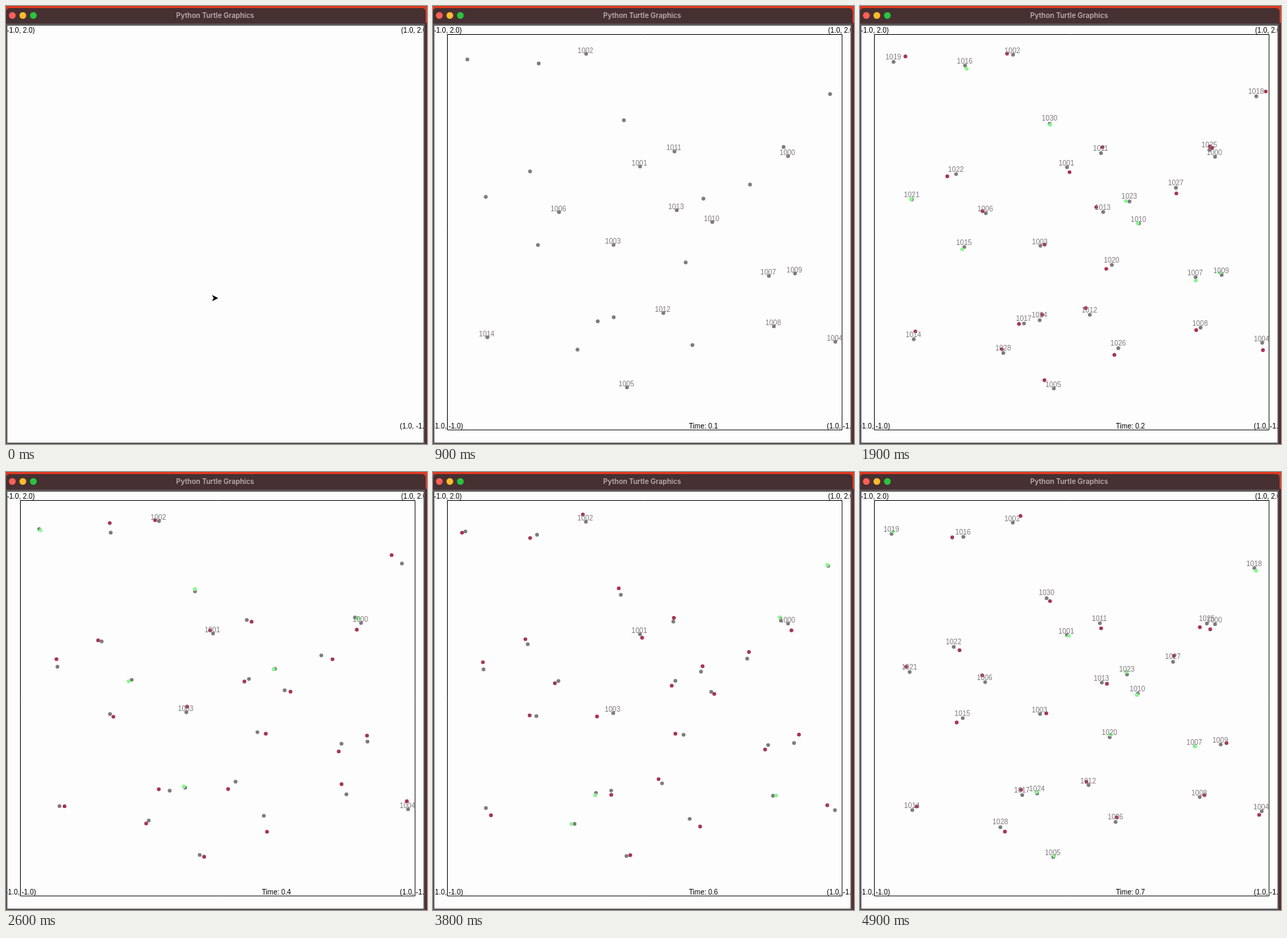
Recreate the animation shown at these times as an HTML page with a canvas. Size 600 px wide and 623 px high, loop 5000 ms.

```html
<!DOCTYPE html>
<html lang="en">
<head>
<meta charset="utf-8">
<title>Python Turtle Graphics</title>
<style>
  html, body { margin: 0; width: 100%; height: 100%; overflow: hidden; background: #fefdfe; }
  canvas { display: block; }
</style>
</head>
<body>
<canvas id="stage" width="600" height="623"></canvas>
<script>
const ctx = document.getElementById('stage').getContext('2d');
const LOOP = 5000, STEP = 606, FIRST = 119, LABEL_GAP = 12;
const LEFT = 20.5, TOP = 40.5, SIZE = 562.5;
const GRAY = '#7f7b7d', RED = '#a63552', GREEN = '#86f98c';

// Where each body is halfway through the run
const bodies = [
  [506, 215], [295, 230], [218, 70], [257, 342], [573, 480], [276, 545],
  [179, 296], [478, 387], [485, 459], [515, 384], [397, 311], [343, 211],
  [327, 441], [346, 295], [76, 476], [148, 345], [149, 87], [233, 454],
  [564, 131], [47, 82], [358, 371], [73, 278], [136, 242], [383, 281],
  [255, 450], [497, 208], [367, 490], [449, 262], [203, 497], [269, 171]
];
const idOf = i => 1000 + i + (i > 28 ? 1 : 0);

// Later bodies drift faster, mostly downwards
function place(i, step) {
  const [x, y] = bodies[i], k = step - 4.5;
  return [x - 0.03 * i * k, y + (0.4 + 0.07 * i) * k];
}

function random(n) {
  const v = Math.sin(n * 12.9898 + 4.1) * 43758.5453;
  return v - Math.floor(v);
}

// Offset of the estimate from its body; the spread narrows with each step
function noise(i, step) {
  const n = i * 41 + step * 7;
  const r = (9 - 0.35 * step) * Math.sqrt(-2 * Math.log(random(n) + 1e-6));
  const a = 2 * Math.PI * random(n + 0.5);
  return [r * Math.cos(a), r * Math.sin(a) - 1.5];
}

// Latest step whose start, moved earlier by lead, has been reached
const stepAt = (t, lead) => Math.floor((t + lead - FIRST) / STEP);

function rect(x, y, w, h, color) {
  ctx.fillStyle = color;
  ctx.fillRect(x, y, w, h);
}

function dot(x, y, r, color) {
  ctx.fillStyle = color;
  ctx.beginPath();
  ctx.arc(x, y, r, 0, 2 * Math.PI);
  ctx.fill();
}

function text(s, x, y, color = '#000', font = '10px "Liberation Sans", Arial, sans-serif') {
  ctx.font = font;
  ctx.textAlign = 'center';
  ctx.fillStyle = color;
  ctx.fillText(s, x, y);
}

function drawWindow() {
  rect(0, 0, 600, 623, '#e0391f');
  ctx.fillStyle = '#463032';
  ctx.beginPath();
  ctx.roundRect(0, 3, 598, 640, 5);
  ctx.fill();
  rect(598, 24, 2, 599, '#5c2a26');
  rect(0, 25, 597, 598, '#5d5a5b');
  rect(2, 28, 593, 593, '#fefdfe');
  ['#fe5f57', '#febb2e', '#29c440'].forEach((c, i) => dot(9 + 15 * i, 13.5, 4.8, c));
  text('Python Turtle Graphics', 298, 17, '#bcaeaf', '600 10px Inter, sans-serif');
}

function drawArrow() {
  ctx.fillStyle = '#000';
  ctx.beginPath();
  [[302.5, 415.5], [293.5, 411], [296, 415.5], [293.5, 420]].forEach(p => ctx.lineTo(...p));
  ctx.fill();
}

function drawField(t) {
  const right = LEFT + SIZE, bottom = TOP + SIZE;
  text('(-1.0, 2.0)', LEFT - 1, TOP - 2.5);
  text('(1.0, 2.0)', right, TOP - 2.5);
  text('(1.0, -1.0)', right, bottom - 2);
  if (t < 100) return drawArrow();
  text('(-1.0, -1.0)', LEFT - 1, bottom - 2);
  ctx.strokeStyle = '#111';
  ctx.lineWidth = 1;
  ctx.setLineDash([4 * SIZE * Math.min(1, (t - 50) / 250), 4 * SIZE]);
  ctx.strokeRect(LEFT, TOP, SIZE, SIZE);
  ctx.setLineDash([]);
}

function drawBodies(t) {
  bodies.forEach((_, i) => {
    const step = stepAt(t, 220 - 3 * i);
    if (step > 0) dot(...place(i, step), 2.7, GRAY);
  });
  bodies.forEach((_, i) => {
    const step = stepAt(t, 135 - 2 * i);
    if (step < 2) return;
    const [x, y] = place(i, step), [dx, dy] = noise(i, step);
    dot(x + dx, y + dy, 2.7, Math.hypot(dx, dy) < 5 ? GREEN : RED);
  });
}

function drawLabels(t) {
  const step = stepAt(t, 0);
  if (step < 1) return;
  text('Time: ' + (step / 10).toFixed(1), 385.5, TOP + SIZE - 2);
  const shown = (t - FIRST - step * STEP) / LABEL_GAP;
  bodies.forEach((_, i) => {
    if (i >= shown) return;
    const [x, y] = place(i, step);
    text(idOf(i), x - 1, y - 1.6, GRAY);
  });
}

function draw(now) {
  const t = now % LOOP;
  drawWindow();
  ctx.save();
  ctx.beginPath();
  ctx.rect(2, 28, 593, 593);
  ctx.clip();
  drawField(t);
  drawBodies(t);
  drawLabels(t);
  ctx.restore();
}

const start = performance.now();
function tick() {
  draw(performance.now() - start);
  requestAnimationFrame(tick);
}
tick();
</script>
</body>
</html>
```
